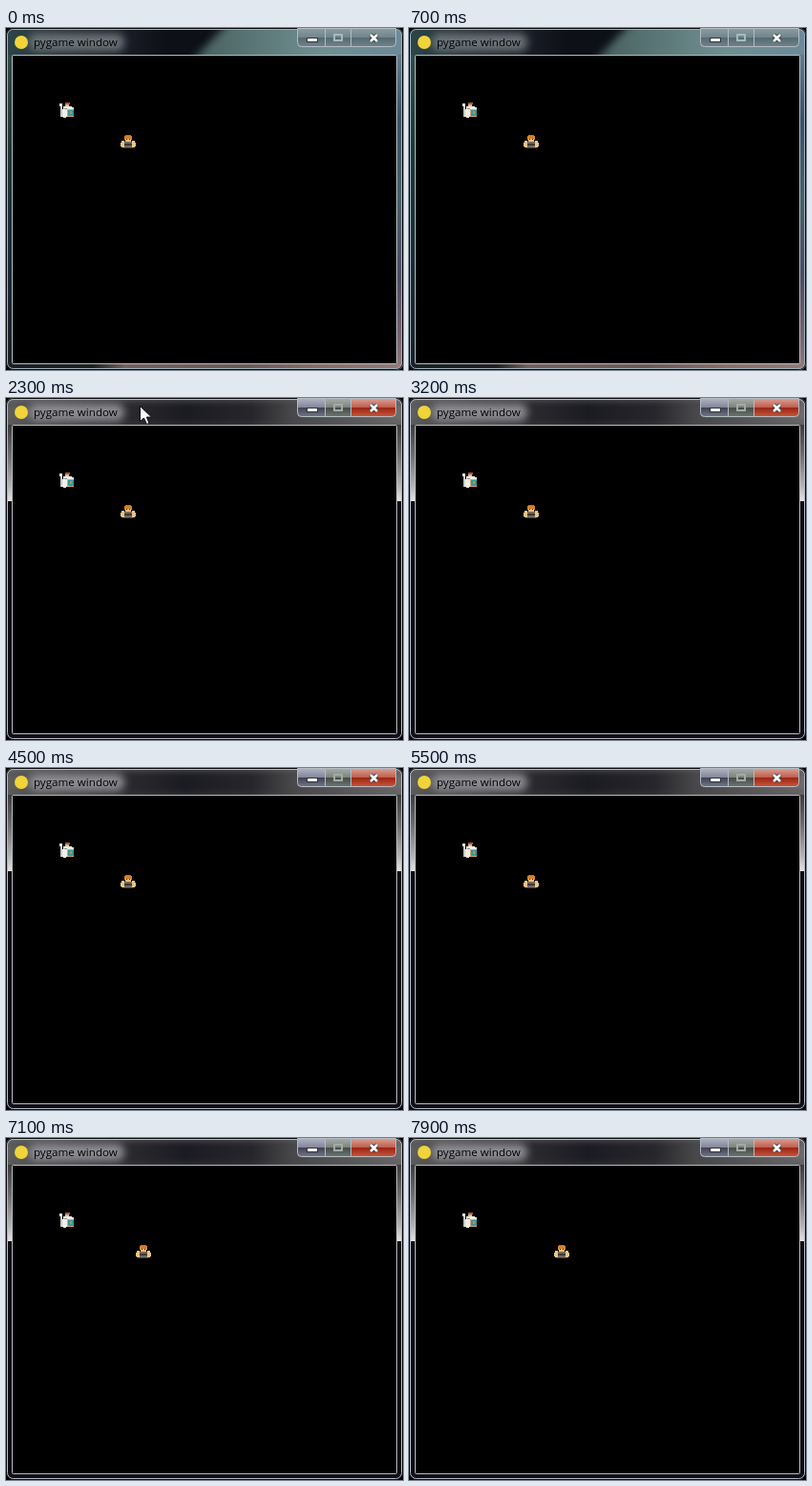
Write an HTML page with a canvas that moves like this. It is 416 px wide and 358 px high and loops after 8 s.

```html
<!DOCTYPE html>
<html lang="en">
<head>
<meta charset="utf-8">
<title>pygame window</title>
<style>
html, body { margin: 0; width: 100%; height: 100%; overflow: hidden; background: #000; }
canvas { display: block; }
</style>
</head>
<body>
<canvas id="stage" width="416" height="358"></canvas>
<script>
const W = 416, H = 358, LOOP = 8000, ACTIVE_AT = 2200;
const ctx = document.getElementById('stage').getContext('2d');

function rect(color, x, y, w, h) {
  ctx.fillStyle = color;
  ctx.fillRect(x, y, w, h);
}

function gradient(x0, y0, x1, y1, stops) {
  const g = ctx.createLinearGradient(x0, y0, x1, y1);
  stops.forEach(([at, color]) => g.addColorStop(at, color));
  return g;
}

function poly(color, points) {
  ctx.beginPath();
  points.forEach(([x, y]) => ctx.lineTo(x, y));
  ctx.closePath();
  ctx.fillStyle = color;
  ctx.fill();
}

function roundPath(x, y, w, h, r) {
  ctx.beginPath();
  ctx.roundRect(x, y, w, h, r);
}

function inactiveGlass() {
  rect(gradient(0, 0, W, 0, [
    [0, '#2c4649'], [0.12, '#293337'], [0.3, '#1a1d26'], [0.4, '#0d1017'], [1, '#0d1017']
  ]), 0, 0, W, 29);
  ctx.save();
  ctx.filter = 'blur(4px)';
  poly(gradient(200, 0, W, 0, [
    [0, '#48605f'], [0.25, '#587474'], [0.6, '#708e92'], [1, '#6c8a98']
  ]), [[236, -8], [430, -8], [430, 40], [190, 40], [214, 14]]);
  ctx.restore();
  rect(gradient(0, 28, 0, H, [
    [0, '#324a4c'], [0.3, '#1f3638'], [0.65, '#1c2a34'], [1, '#1b2028']
  ]), 0, 28, 7, 330);
  rect(gradient(0, 28, 0, H, [
    [0, '#5f7d8c'], [0.2, '#3a5266'], [0.45, '#48606a'], [0.7, '#4a4c64'], [0.9, '#7a6272'], [1, '#937a7c']
  ]), 409, 28, 7, 330);
  rect(gradient(0, 0, W, 0, [
    [0, '#1a2024'], [0.22, '#1f2022'], [0.3, '#75605c'], [0.6, '#6c5856'], [0.8, '#8a6e68'], [1, '#937a78']
  ]), 0, 351, W, 7);
}

function activeGlass() {
  rect(gradient(0, 0, W, 0, [
    [0, '#60605f'], [0.1, '#4c4c4d'], [0.3, '#2b2b2f'], [0.45, '#1b1b22'],
    [0.62, '#26262b'], [0.72, '#48484a'], [1, '#6c6c6d']
  ]), 0, 0, W, 29);
  rect(gradient(0, 0, 0, 29, [
    [0, '#77777c88'], [0.35, '#30303400'], [0.7, '#30303400'], [1, '#5a5a5a55']
  ]), 0, 0, W, 29);
  const side = gradient(0, 28, 0, 108, [[0, '#3c3c3e'], [0.4, '#6e6e70'], [0.8, '#b4b4b4'], [1, '#e4e4e2']]);
  [0, 409].forEach(x => {
    rect('#0c0c14', x, 108, 7, 250);
    rect(side, x, 28, 7, 80);
  });
  rect('#0f0f17', 0, 351, W, 7);
}

function titleGlow(color) {
  ctx.save();
  ctx.filter = 'blur(4px)';
  ctx.fillStyle = color;
  roundPath(24, 6, 100, 18, 8);
  ctx.fill();
  ctx.restore();
}

function button(x, w, stops, radii) {
  roundPath(x + 0.5, 0.5, w, 19, radii);
  ctx.fillStyle = gradient(0, 0, 0, 20, stops);
  ctx.fill();
  ctx.strokeStyle = '#b4bcc4';
  ctx.lineWidth = 1;
  ctx.stroke();
}

function cross(color, width) {
  ctx.strokeStyle = color;
  ctx.lineWidth = width;
  ctx.beginPath();
  ctx.moveTo(382, 7); ctx.lineTo(389, 14);
  ctx.moveTo(389, 7); ctx.lineTo(382, 14);
  ctx.stroke();
}

function buttons(active) {
  const idle = [[0, '#8d9ea4'], [0.48, '#71858c'], [0.52, '#566a73'], [1, '#70858d']];
  const glass = [[0, '#b4b6c2'], [0.48, '#83869a'], [0.52, '#404352'], [1, '#767a8c']];
  const grey = [[0, '#a9aeaa'], [0.48, '#7d847f'], [0.52, '#464d49'], [1, '#707872']];
  const red = [[0, '#dca396'], [0.48, '#c0604f'], [0.52, '#9a2514'], [1, '#cc5a3c']];
  button(305, 29, active ? glass : idle, [0, 0, 0, 4]);
  button(334, 27, active ? grey : idle, 0);
  button(361, 47, active ? red : idle, [0, 0, 4, 0]);

  rect('#30363c', 315, 10, 12, 5);
  rect('#fff', 316, 11, 10, 3);
  ctx.strokeStyle = active ? '#a3aaa6' : '#a9b9ba';
  ctx.lineWidth = 2;
  ctx.strokeRect(344, 7, 8, 6);
  cross('#353b42', 4.5);
  cross('#fff', 2.6);
}

function windowFrame(active) {
  rect('#000', 0, 0, W, H);
  ctx.save();
  roundPath(0, 0, W, H, 7);
  ctx.clip();
  active ? activeGlass() : inactiveGlass();
  titleGlow(active ? '#8c8c92' : '#6c7478');
  ctx.restore();

  ctx.lineWidth = 1;
  ctx.strokeStyle = '#0a0c0e';
  roundPath(0.5, 0.5, W - 1, H - 1, 7);
  ctx.stroke();
  ctx.strokeStyle = active ? '#b8bac6' : '#9fb2b8';
  roundPath(1.5, 1.5, W - 3, H - 3, 6);
  ctx.stroke();

  rect('#000', 7, 29, 402, 322);
  ctx.strokeStyle = active ? '#b9bac0' : '#b2bec2';
  roundPath(6.5, 28.5, 403, 323, 1);
  ctx.stroke();

  ctx.fillStyle = '#f0d43a';
  ctx.beginPath();
  ctx.arc(16, 15, 7, 0, Math.PI * 2);
  ctx.fill();
  ctx.fillStyle = '#000';
  ctx.font = '11.6px "Open Sans", "Noto Sans", sans-serif';
  ctx.fillText('pygame window', 29, 19);
  buttons(active);
}

function guard(x, y) {
  rect('#e4e2da', x, y + 1, 3, 3);
  rect('#c9c9c5', x + 1, y + 4, 2, 11);
  rect('#a4593a', x + 6, y, 5, 2);
  rect('#e8b48c', x + 6, y + 2, 4, 2);
  rect('#f2eee6', x + 4, y + 4, 9, 3);
  rect('#f2eee6', x + 3, y + 7, 6, 8);
  rect('#8d8f8f', x + 5, y + 6, 3, 1);
  rect('#d9a072', x + 8, y + 7, 7, 8);
  rect('#2b9ba0', x + 9, y + 8, 6, 6);
  rect('#d2864c', x + 11, y + 9, 2, 3);
  rect('#e6e6e0', x + 13, y + 5, 2, 2);
  rect('#e6e6e0', x + 4, y + 15, 3, 1);
}

function walker(x, y) {
  rect('#c8701f', x + 5, y, 6, 1);
  rect('#d87f28', x + 4, y + 1, 8, 4);
  rect('#f0bd83', x + 5, y + 4, 6, 3);
  rect('#3a2517', x + 6, y + 4, 1, 1);
  rect('#3a2517', x + 9, y + 4, 1, 1);
  [1, 12].forEach(dx => rect('#e6c58a', x + dx, y + 6, 3, 7));
  [0, 15].forEach(dx => rect('#e6c58a', x + dx, y + 8, 1, 4));
  rect('#77695a', x + 4, y + 7, 8, 6);
  rect('#3d3935', x + 4, y + 9, 8, 2);
  rect('#4a3d31', x + 3, y + 13, 10, 1);
}

// The walker moves one 16 px tile at a time.
function walkerX(t) {
  const steps = [[5800, -1], [6700, 1], [7000, 1], [7300, 1]];
  return steps.reduce((x, [at, dir]) => t >= at ? x + 16 * dir : x, 120);
}

function cursorPos(t) {
  const keys = [[1000, 160, -24], [1400, 142, -6], [1900, 140, 8], [2300, 140, 8], [2700, 156, -24]];
  for (let i = 1; i < keys.length; i++) {
    const [t0, x0, y0] = keys[i - 1], [t1, x1, y1] = keys[i];
    if (t >= t0 && t < t1) {
      const k = (t - t0) / (t1 - t0);
      return [Math.round(x0 + (x1 - x0) * k), Math.round(y0 + (y1 - y0) * k)];
    }
  }
  return null;
}

function cursor([x, y]) {
  ctx.save();
  ctx.translate(x + 0.5, y + 0.5);
  poly('#fff', [[0, 0], [0, 16], [4, 12.5], [7, 19], [9.5, 18], [6.8, 11.5], [12, 11.5]]);
  ctx.strokeStyle = '#111';
  ctx.lineWidth = 1;
  ctx.stroke();
  ctx.restore();
}

function draw(now) {
  const t = Math.floor((now % LOOP) / 100) * 100;
  windowFrame(t >= ACTIVE_AT);
  guard(56, 78);
  walker(walkerX(t), 112);
  const pos = cursorPos(t);
  if (pos) cursor(pos);
}

const start = performance.now();
function tick() {
  draw(performance.now() - start);
  requestAnimationFrame(tick);
}
tick();
</script>
</body>
</html>
```
